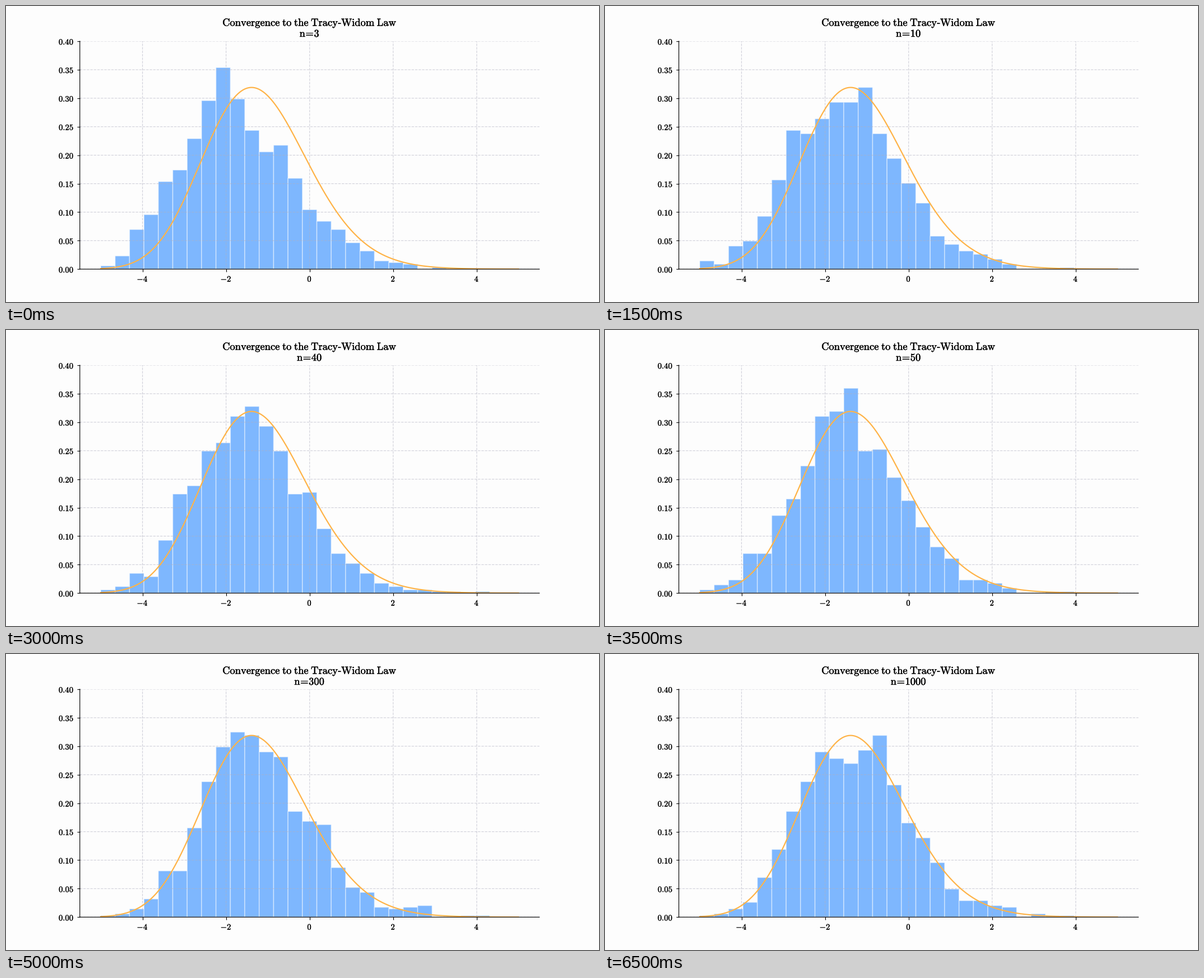
Write a matplotlib script that moves like this. It is 1058 px wide and 529 px high and loops after 7000 ms.

```python
import math

import matplotlib.pyplot as plt
import numpy as np
from matplotlib.animation import FuncAnimation
from matplotlib.patheffects import withStroke

plt.rcParams.update({"mathtext.fontset": "cm", "path.snap": False})

W, H, DPI = 1058, 529, 105.8
BG = "#fdfdfd"
SIZES = [3, 4, 5, 10, 20, 30, 40, 50, 100, 200, 300, 400, 500, 1000]
DRAWS = 1000
EDGES = np.linspace(-5, 5, 30)
STEP = EDGES[1] - EDGES[0]


def tracy_widom(x):
    """Shifted gamma density with a small kurtosis correction."""
    k, theta, shift = 46.446, 0.186054, 9.84801
    u = (x + shift) / theta
    gamma = np.exp((k - 1) * np.log(u) - u - math.lgamma(k)) / theta
    z = (x + 1.2065) / 1.268
    return gamma * (1 + 0.0015 * (z**4 - 6 * z**2 + 3))


def sample_heights(n):
    """Histogram of random draws; small n lies further left and spreads more."""
    x = EDGES[:-1] + STEP / 2
    p = tracy_widom(x + 0.75 * n**-0.4 - 0.25 / n * (x + 1.7))
    counts = np.random.default_rng(n).multinomial(DRAWS, p / p.sum())
    return counts / (DRAWS * STEP)


def roman(text):
    text = text.replace(" ", r"\;").replace("-", "\u2010").replace("=", r"\!=\!")
    return rf"$\mathrm{{{text}}}$"


def thicken(text, width):
    text.set_path_effects([withStroke(linewidth=width, foreground="black")])
    return text


def heading(y, text):
    label = fig.text(0.512, 1 - y / H, roman(text), fontsize=12.6,
                     ha="center", va="baseline")
    return thicken(label, 0.3)


HEIGHTS = [sample_heights(n) for n in SIZES]

fig = plt.figure(figsize=(W / DPI, H / DPI), dpi=DPI, facecolor=BG)
ax = fig.add_axes([0.1245, 0.111, 0.775, 0.77], facecolor=BG)
ax.set_xlim(-5.5, 5.5)
ax.set_ylim(0, 0.4)
ax.spines[["top", "right"]].set_visible(False)

xticks = range(-4, 5, 2)
yticks = np.arange(9) * 0.05
ax.set_xticks(xticks, [f"${x}$" for x in xticks])
ax.set_yticks(yticks, [f"${y:.2f}$" for y in yticks])
for tick in ax.get_xticklabels() + ax.get_yticklabels():
    thicken(tick, 0.15)
ax.grid(color="#b0b0c0", alpha=0.55, lw=0.8, ls="--")

bars = ax.bar(EDGES[:-1], HEIGHTS[0], STEP, align="edge",
              color="#0073ff", edgecolor="white", lw=1, alpha=0.5)
xs = np.linspace(-5, 5, 400)
ax.plot(xs, tracy_widom(xs), color="#ffb347", lw=1.5)

heading(35.5, "Convergence to the Tracy-Widom Law")
label = heading(55, "n=3")


def update(i):
    for bar, h in zip(bars, HEIGHTS[i]):
        bar.set_height(h)
    label.set_text(roman(f"n={SIZES[i]}"))
    return [*bars, label]


anim = FuncAnimation(fig, update, frames=len(SIZES), interval=500,
                     init_func=lambda: update(0), repeat=True, repeat_delay=0)
plt.show()
```
